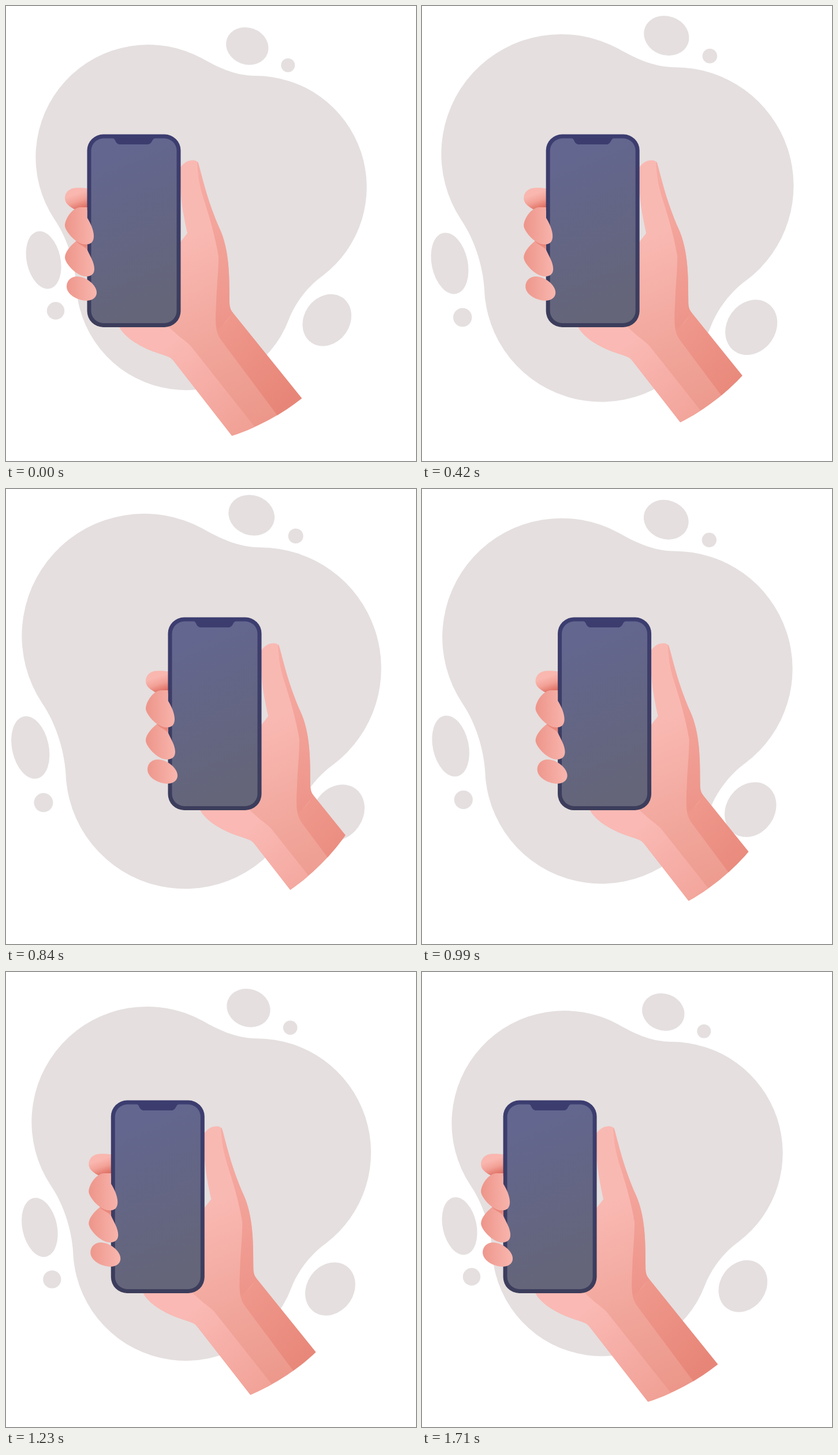
Animation, 710 px wide and 789 px high, one loop 1740 ms. Source, as an HTML page:

```html
<!DOCTYPE html>
<html lang="en">
<head>
<meta charset="utf-8">
<title>Hand with phone</title>
<style>
  html, body { margin: 0; width: 100%; height: 100%; overflow: hidden; background: #fff; }
  svg { display: block; width: 100%; height: 100%; }
</style>
</head>
<body>
<svg viewBox="0 0 710 789">
  <defs>
    <clipPath id="reach"><circle cx="270.5" cy="375.5" r="389"/></clipPath>

    <g id="grads"></g>
    <linearGradient id="palm" gradientUnits="userSpaceOnUse" x1="310" y1="400" x2="440" y2="720">
      <stop offset="0" stop-color="#f9b9b3"/><stop offset=".55" stop-color="#f1a69b"/><stop offset="1" stop-color="#ec978a"/>
    </linearGradient>
    <linearGradient id="heel" gradientUnits="userSpaceOnUse" x1="290" y1="580" x2="410" y2="735">
      <stop offset="0" stop-color="#fab9b4"/><stop offset="1" stop-color="#f1a196"/>
    </linearGradient>
    <linearGradient id="side" gradientUnits="userSpaceOnUse" x1="340" y1="290" x2="380" y2="550">
      <stop offset="0" stop-color="#f6aca4"/><stop offset="1" stop-color="#ee958a"/>
    </linearGradient>
    <linearGradient id="wrist" gradientUnits="userSpaceOnUse" x1="375" y1="560" x2="495" y2="675">
      <stop offset="0" stop-color="#ef978b"/><stop offset="1" stop-color="#e78678"/>
    </linearGradient>
    <linearGradient id="frame" gradientUnits="userSpaceOnUse" x1="0" y1="222" x2="0" y2="557">
      <stop offset="0" stop-color="#3c3d70"/><stop offset="1" stop-color="#3c3d5b"/>
    </linearGradient>
    <linearGradient id="screen" gradientUnits="userSpaceOnUse" x1="170" y1="260" x2="285" y2="520">
      <stop offset="0" stop-color="#63668f"/><stop offset="1" stop-color="#646578"/>
    </linearGradient>
    <linearGradient id="index" gradientUnits="userSpaceOnUse" x1="119" y1="327" x2="128" y2="353">
      <stop offset="0" stop-color="#f9b7af"/><stop offset=".45" stop-color="#f3a197"/><stop offset="1" stop-color="#de6c5f"/>
    </linearGradient>
    <linearGradient id="finger" gradientUnits="userSpaceOnUse" x1="104" y1="0" x2="154" y2="0">
      <stop offset="0" stop-color="#ee968b"/><stop offset="1" stop-color="#f8b5ad"/>
    </linearGradient>
    <linearGradient id="shade" gradientUnits="userSpaceOnUse" x1="134" y1="411" x2="130" y2="423">
      <stop offset="0" stop-color="#e67d70"/><stop offset="1" stop-color="#f1a297"/>
    </linearGradient>
  </defs>

  <g id="blobs" fill="#e5dfdf">
    <path d="M122 492C121 450 107 404 84 370A195 195 0 0 1 340 91C363 104 395 121 432 121
      A193 193 0 0 1 548 468C519 489 499 519 490 543A190.5 190.5 0 0 1 122 492Z"/>
    <ellipse rx="37.4" ry="31.8" transform="translate(417.8 69.5) rotate(20)"/>
    <circle cx="488.3" cy="102.7" r="12"/>
    <ellipse rx="29.3" ry="50.7" transform="translate(65.1 440.5) rotate(-12)"/>
    <circle cx="86" cy="528.5" r="15.2"/>
    <ellipse rx="39.6" ry="47.4" transform="translate(555.8 544.7) rotate(35)"/>
  </g>

  <g clip-path="url(#reach)">
    <g id="hand">
      <path fill="url(#palm)" d="M296 290C303 276 311 267.5 323 267.5C330 267.5 332 270 334 276
        C341 302 350 341 370 386C387 423 387 470 387 512C387 520 388 526 393 532
        L520 690L400 756.6L290 615C283 606 275 607 250 597C224 586 204 572 196 556
        L200 430H290L303 408L314 394C309 370 303 345 302 310Z"/>
      <path fill="url(#heel)" d="M196 556H281L300 573C308 579 315 584 321 591L442 744L400 756.6
        L290 615C283 606 275 607 250 597C224 586 204 572 196 556Z"/>
      <path fill="url(#side)" d="M331 269.5C333 271 333.500 274 334 276C341 302 350 341 370 386
        C387 423 387 470 387 512C387 520 388 526 393 532L366 565C362 555 363 535 364 515
        C365 485 368 460 368 434C362 398 352 365 342 334C335 311 332 295 331 269.500Z"/>
      <path fill="url(#wrist)" d="M365 562C376 554 386 544 392 531L520 690L480 723.500L373 580C369 574 366 569 365 562Z"/>

      <path fill="url(#index)" d="M145 317C135 315 126 315 120 315.500C109 316 102 324 102 333C102 344 113 349 121 354H145Z"/>
      <rect x="140.5" y="222.5" width="162" height="334.500" rx="28" fill="url(#frame)"/>
      <rect x="147.5" y="229.500" width="148" height="320.500" rx="21.500" fill="url(#screen)"/>
      <path fill="#3c3d6e" d="M184 229C191 229.500 188 240 198 240H245C254 240 252 229.500 259 229Z"/>

      <path fill="url(#finger)" d="M121 408C111 416 102 427 102 436C102 446 122 469 139 469
        C148 469 153 464 153 456C153 444 145 433 140.500 422V408Z"/>
      <path fill="url(#shade)" d="M121 407C127 415 134 415 140.500 423V408Z"/>
      <path fill="url(#finger)" d="M140.500 349H128C114 350 102 370 102 381C102 389 120 413.500 138 413.500
        C148 413.500 152 408 152 399C152 388 146 376 140.500 367Z"/>
      <path fill="url(#finger)" d="M105 486C105 476 113 469 123 469C139 469 157 484 157 497
        C157 506 149 511 139 511C122 510 105 500 105 486Z"/>
    </g>
  </g>
</svg>
<script>
  const LOOP = 1740, TURN = 840, STEP = 30;
  const SHIFT = 140, GROWTH = 0.0857;
  const CX = 331.5, CY = 350;
  const blobs = document.getElementById('blobs');
  const hand = document.getElementById('hand');

  // Both parts rise on their own curve and share one decelerating return.
  const fall = t => Math.pow(1 - (t - TURN) / (LOOP - STEP - TURN + STEP), 2.15);
  const slide = u => u + 0.12 * u * (1 - u);
  const swell = u => 1 - (1 - u) * (1 - u);

  function draw(now) {
    const t = Math.floor((now % LOOP) / STEP) * STEP;
    const at = rise => t < TURN ? rise(t / TURN) : fall(t);
    const scale = 1 + GROWTH * at(swell);
    hand.setAttribute('transform', `translate(${SHIFT * at(slide)} 0)`);
    blobs.setAttribute('transform',
      `translate(${CX} ${CY}) scale(${scale}) translate(${-CX} ${-CY})`);
  }

  const start = performance.now();
  function tick() {
    draw(performance.now() - start);
    requestAnimationFrame(tick);
  }
  tick();
</script>
</body>
</html>
```
